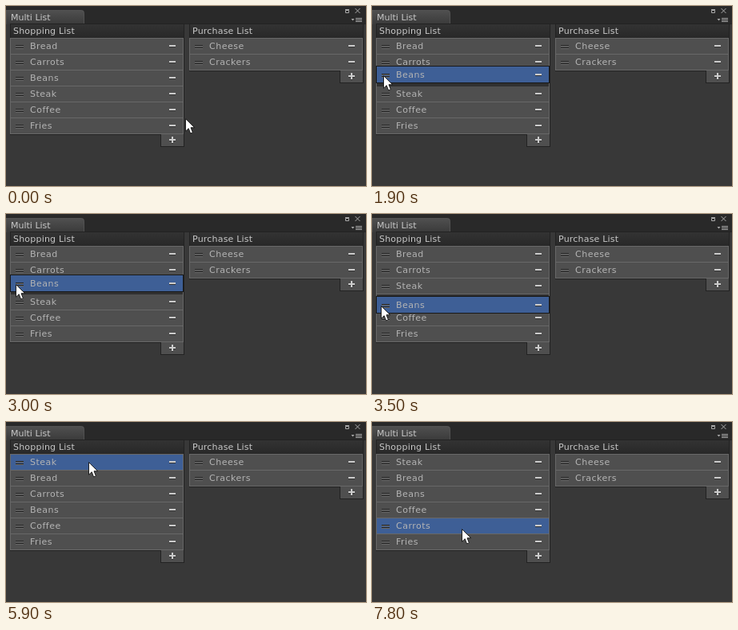
Write an HTML page that moves like this. It is 450 px wide and 226 px high and loops after 8 s.

```html
<!DOCTYPE html>
<html lang="en">
<head>
<meta charset="utf-8">
<title>Multi List</title>
<style>
  html, body { margin: 0; width: 100%; height: 100%; overflow: hidden; background: #383838; }
  svg { display: block; width: 450px; height: 226px; }
  text { font: 11px "DejaVu Sans", Verdana, sans-serif; fill: #b4b4b4; letter-spacing: .5px; }
  .title { fill: #c8c8c8; letter-spacing: .2px; }
  .tab { letter-spacing: 0; }
  .crisp { shape-rendering: crispEdges; }
</style>
</head>
<body>
<svg id="stage" viewBox="0 0 450 226">
  <defs>
    <linearGradient id="tab" x2="0" y2="1">
      <stop stop-color="#505050"/><stop offset="1" stop-color="#3a3a3a"/>
    </linearGradient>
    <linearGradient id="head" x2="0" y2="1">
      <stop stop-color="#333"/><stop offset="1" stop-color="#282828"/>
    </linearGradient>
    <pattern id="dots" width="2" height="2" patternUnits="userSpaceOnUse">
      <path d="M0 0h2v2h-2z" fill="#222"/><path d="M0 0h1v1h-1zM1 1h1v1h-1z" fill="#ddd"/>
    </pattern>
  </defs>
  <path d="M0 0H450V22H0z" fill="#292929"/>
  <path d="M0 22.5H450" stroke="#242424"/>
  <path d="M0 23V5.5H94.5Q97.5 5.5 97.5 8.5V23" fill="url(#tab)" stroke="#5e5e5e" stroke-width=".7"/>
  <text class="title tab" x="6" y="18">Multi List</text>
  <g stroke="#a8a8a8" fill="none">
    <path d="M424.5 5.5h4v3h-4zM424 4.5h5"/>
    <path d="M436.5 3l6 6m0-6l-6 6"/>
    <path d="M437 15.5h8m-8 2h8m-8 2h8"/>
    <path d="M431.5 16h4l-2 2.5z" fill="#a8a8a8" stroke="none"/>
  </g>
  <g id="lists"></g>
  <g id="rows"></g>
  <rect id="line" class="crisp" x="5" width="217" height="2" fill="#161616"/>
  <g id="cursor">
    <path d="M.5 .6V16.2L4.2 12.7L6.6 18.9L9.4 17.7L7 11.7H11.7z" fill="#fff" stroke="#111" stroke-width=".9"/>
    <rect id="icon" x="2" y="16" width="13" height="8" rx="3" fill="url(#dots)"/>
  </g>
</svg>
<script>
const $ = id => document.getElementById(id);
const ROW = 20, TOP = 40;
const center = slot => TOP + ROW / 2 + slot * ROW;

function add(parent, tag, attrs, text = "") {
  const el = document.createElementNS("http://www.w3.org/2000/svg", tag);
  for (const k in attrs) el.setAttribute(k, attrs[k]);
  el.textContent = text;
  return parent.appendChild(el);
}
const box = (parent, x, y, width, height, fill) =>
  add(parent, "rect", { x, y, width, height, fill, class: "crisp" });

// Plus or minus sign with a soft shadow below
function sign(parent, x, y, plus) {
  for (const [dy, fill] of [[1, "#333"], [0, "#ccc"]]) {
    box(parent, x - 4, y - 1 + dy, 8, 2, fill);
    if (plus) box(parent, x - 1, y - 4 + dy, 2, 8, fill);
  }
}

function makeList(x, title, items) {
  const g = $("lists"), end = TOP + items.length * ROW;
  box(g, x, 22, 218, end - 20, "#222");
  box(g, x + 1, 23, 216, 17, "url(#head)");
  add(g, "text", { x: x + 4, y: 35, class: "title" }, title);
  box(g, x, TOP, 217, end - TOP + 1, "#686868");
  box(g, x + 1, TOP + 1, 215, end - TOP - 1, "#303030");
  box(g, x + 188, end + 1, 30, 16, "#222");
  box(g, x + 189, end + 1, 28, 15, "#4f4f4f");
  sign(g, x + 203, end + 8, true);

  return Object.fromEntries(items.map((name, i) => {
    const row = add($("rows"), "g", { transform: `translate(${x} ${center(i)})` });
    box(row, 1, -9, 215, 19, "#4f4f4f");
    box(row, 1, 10, 215, 1, "#686868");
    const edge = box(row, 0, -11, 217, 22, "#181818");
    const fill = box(row, 1, -9, 215, 19, "#3e5f96");
    edge.style.display = fill.style.display = "none";
    for (const y of [-1, 2]) {
      box(row, 7, y, 10, 1, "#262626");
      box(row, 7, y + 1, 10, 1, "#686868");
    }
    add(row, "text", { x: 25, y: 4 }, name);
    sign(row, 203, 0);
    return [name, { row, edge, fill }];
  }));
}

const start = ["Bread", "Carrots", "Beans", "Steak", "Coffee", "Fries"];
const shopping = makeList(5, "Shopping List", start);
makeList(229, "Purchase List", ["Cheese", "Crackers"]);

// Pointer path: time, x, y
const path = [
  [100, 224, 141], [200, 235, 137], [800, 1, 91], [900, 1, 91], [1100, 15, 91],
  [1700, 15, 91], [2400, 12, 73], [2700, 12, 73], [3500, 11, 115], [4000, 11, 115],
  [4500, 100, 91], [4900, 100, 91], [5000, 101, 89], [5600, 103, 50], [5900, 103, 50],
  [6400, 109, 94], [6800, 109, 94], [7700, 112, 134]
];

function pointer(t) {
  const i = path.findIndex(p => p[0] >= t);
  if (i < 0) return path.at(-1).slice(1);
  if (!i) return path[0].slice(1);
  const a = path[i - 1], b = path[i], u = (t - a[0]) / (b[0] - a[0]);
  const e = u * u * (3 - 2 * u), k = (u + e) / 2;
  return [1, 2].map(n => Math.round(a[n] + (b[n] - a[n]) * k));
}

function moved(list, name, slot) {
  const out = list.filter(n => n !== name);
  out.splice(slot, 0, name);
  return out;
}

const show = (el, on) => el.style.display = on ? "" : "none";

function draw(t) {
  const [x, y] = pointer(t);
  const sliding = t >= 1800 && t < 3800;
  const carrying = (t >= 5000 && t < 5900) || (t >= 6900 && t < 7800);
  const picked = t < 1400 ? "" : t < 4600 ? "Beans" : t < 6500 ? "Steak" : "Carrots";

  let order = start;
  if (sliding) order = moved(order, "Beans", Math.round((y - 51) / ROW));
  if (t >= 3800) order = moved(order, "Beans", 3);
  if (t >= 5900) order = moved(order, "Steak", 0);
  if (t >= 7800) order = moved(order, "Carrots", 4);

  order.forEach((name, i) => {
    const { row, edge, fill } = shopping[name], on = name === picked, drag = on && sliding;
    row.setAttribute("transform", `translate(5 ${drag ? y - 1 : center(i)})`);
    show(fill, on);
    show(edge, drag);
    fill.setAttribute("y", drag ? -10 : -9);
    fill.setAttribute("height", drag ? 20 : 19);
  });
  if (picked) $("rows").append(shopping[picked].row);

  $("line").setAttribute("y", TOP + Math.round((y - 42) / ROW) * ROW);
  show($("line"), carrying);
  show($("icon"), carrying);
  $("cursor").setAttribute("transform", `translate(${x} ${y})`);
}

const begin = performance.now();
function tick() {
  const t = (performance.now() - begin) % 8000;
  draw(Math.floor(t / 100) * 100);
  requestAnimationFrame(tick);
}
tick();
</script>
</body>
</html>
```
